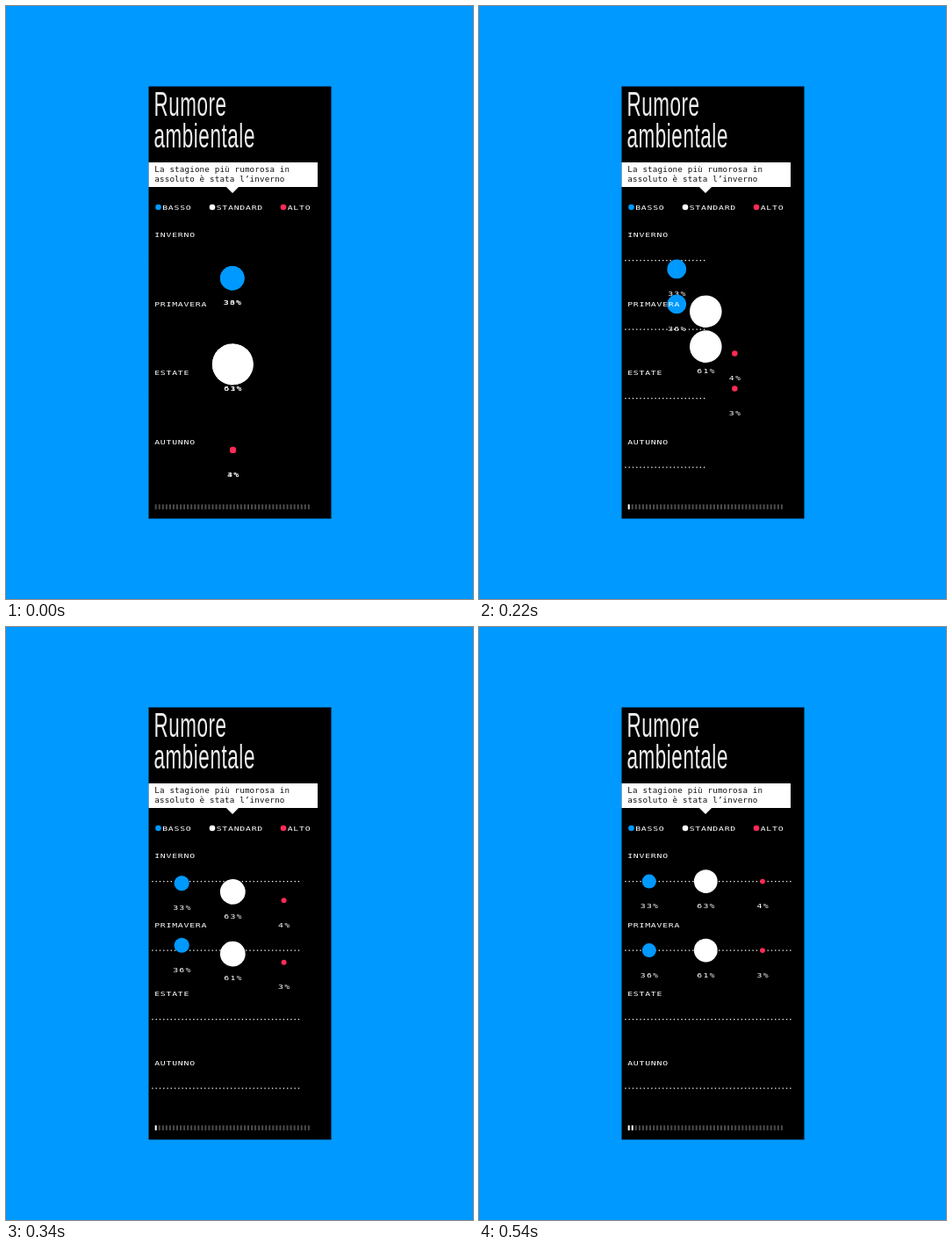
An HTML page that plays this animation: 532x675 px, repeating every 1.6 s.

```html
<!DOCTYPE html>
<html lang="it">
<head>
<meta charset="utf-8">
<title>Rumore ambientale</title>
<style>
  html, body { margin: 0; width: 100%; height: 100%; overflow: hidden; background: #09f; }
  svg { display: block; width: 100%; height: 100%; }
  text { fill: #fff; font: 7px "DejaVu Sans Mono", monospace; letter-spacing: .55px; }
  .title { fill: #eee; font: 38px "Liberation Sans", Arial, sans-serif; letter-spacing: 1px; }
  .note { fill: #111; font-size: 9.2px; letter-spacing: .17px; }
  .value { text-anchor: middle; letter-spacing: .9px; }
  .dots { stroke: #fff; stroke-width: 1.3; stroke-dasharray: 1.3 2.97; }
</style>
</head>
<body>
<svg id="stage" viewBox="0 0 532 675">
  <rect width="532" height="675" fill="#09f"/>
  <rect x="162.5" y="91.5" width="208" height="492"/>
  <g transform="translate(168.4 125) scale(.59 1)">
    <text class="title">Rumore</text>
    <text class="title" y="36">ambientale</text>
  </g>
  <path d="M162.5 178H355V206H265L258 213L251 206H162.5Z" fill="#fff"/>
  <text class="note" x="169.3" y="189">La stagione più rumorosa in</text>
  <text class="note" x="169.3" y="200">assoluto è stata l’inverno</text>
</svg>
<script>
const LOOP = 1600, STEP = 20;
const ROW_Y = 289.6, ROW_GAP = 78.5, VALUE_DROP = 30.4;
const BLUE = '#0099ff', WHITE = '#ffffff', RED = '#ff2a55';
const stage = document.getElementById('stage');

function add(tag, attrs, content = '') {
  const node = document.createElementNS('http://www.w3.org/2000/svg', tag);
  set(node, attrs);
  node.textContent = content;
  return stage.appendChild(node);
}
function set(node, attrs) {
  for (const key in attrs) node.setAttribute(key, attrs[key]);
}
const mix = (a, b, p) => a + (b - a) * p;
const rowY = row => ROW_Y + row * ROW_GAP;
// Small lettering is set in a wide, low face.
const wideAt = (x, y) => ({ transform: `translate(${x} ${y}) scale(1.4 1)` });

// Progress of the transition: [ms, amount], joined by a smooth curve.
const keys = [[0, 0], [80, .078], [160, .256], [220, .509], [300, .808], [380, .953], [540, 1]];
function slope(i) {
  const a = keys[i - 1], b = keys[i + 1];
  return a && b ? (b[1] - a[1]) / (b[0] - a[0]) : 0;
}
function progress(t) {
  const i = keys.findIndex(key => key[0] > t) - 1;
  if (i < 0) return 1;
  const [t0, p0] = keys[i], [t1, p1] = keys[i + 1];
  const d = t1 - t0, u = (t - t0) / d, v = 1 - u;
  return p0 * (1 + 2 * u) * v * v + slope(i) * d * u * v * v
       + p1 * u * u * (3 - 2 * u) - slope(i + 1) * d * u * u * v;
}

const series = [
  { color: BLUE, x: [257.8, 193.8], y: 309.7, r: [13.8, 8], values: ['33%', '36%'] },
  { color: WHITE, x: [258.3, 258.3], y: 407.9, r: [23.4, 13.4], values: ['63%', '61%'] },
  { color: RED, x: [258.5, 323], y: 505.4, r: [3.6, 2.9], values: ['4%', '3%'] }
];

const lines = [0, 1, 2, 3].map(row =>
  add('line', { class: 'dots', x1: 166.3, y1: rowY(row), y2: rowY(row) }));

const bubbles = [0, 1].flatMap(row => series.map(s => ({
  s, row,
  label: add('text', { class: 'value' }, s.values[row]),
  circle: add('circle', { fill: s.color })
})));

['INVERNO', 'PRIMAVERA', 'ESTATE', 'AUTUNNO'].forEach((name, row) =>
  add('text', wideAt(169.2, 263.4 + row * ROW_GAP), name));

[['BASSO', 173.5, BLUE], ['STANDARD', 235, WHITE], ['ALTO', 316, RED]].forEach(([name, x, fill]) => {
  add('circle', { cx: x, cy: 229, r: 3.3, fill });
  add('text', wideAt(x + 4.7, 231.6), name);
});

const ticks = Array.from({ length: 44 }, (_, i) =>
  add('rect', { x: 169.7 + i * 4.05, y: 567.3, width: 2, height: 5.6 }));

function draw(t) {
  const p = progress(t);
  const end = mix(157, 355.5, p);
  lines.forEach(line => set(line, { x2: Math.max(166.3, end) }));

  bubbles.forEach(({ s, row, label, circle }) => {
    const x = mix(...s.x, p), y = mix(s.y, rowY(row), p);
    set(circle, { cx: x, cy: y, r: mix(...s.r, p) });
    set(label, wideAt(x + .7, y + VALUE_DROP));
  });

  const lit = (t >= 200) + (t >= 440);
  ticks.forEach((tick, i) => set(tick, { fill: i < lit ? '#fff' : '#4c4c4c' }));
}

const start = performance.now();
function frame() {
  const t = (performance.now() - start) % LOOP;
  draw(Math.floor(t / STEP) * STEP);
  requestAnimationFrame(frame);
}
frame();
</script>
</body>
</html>
```
